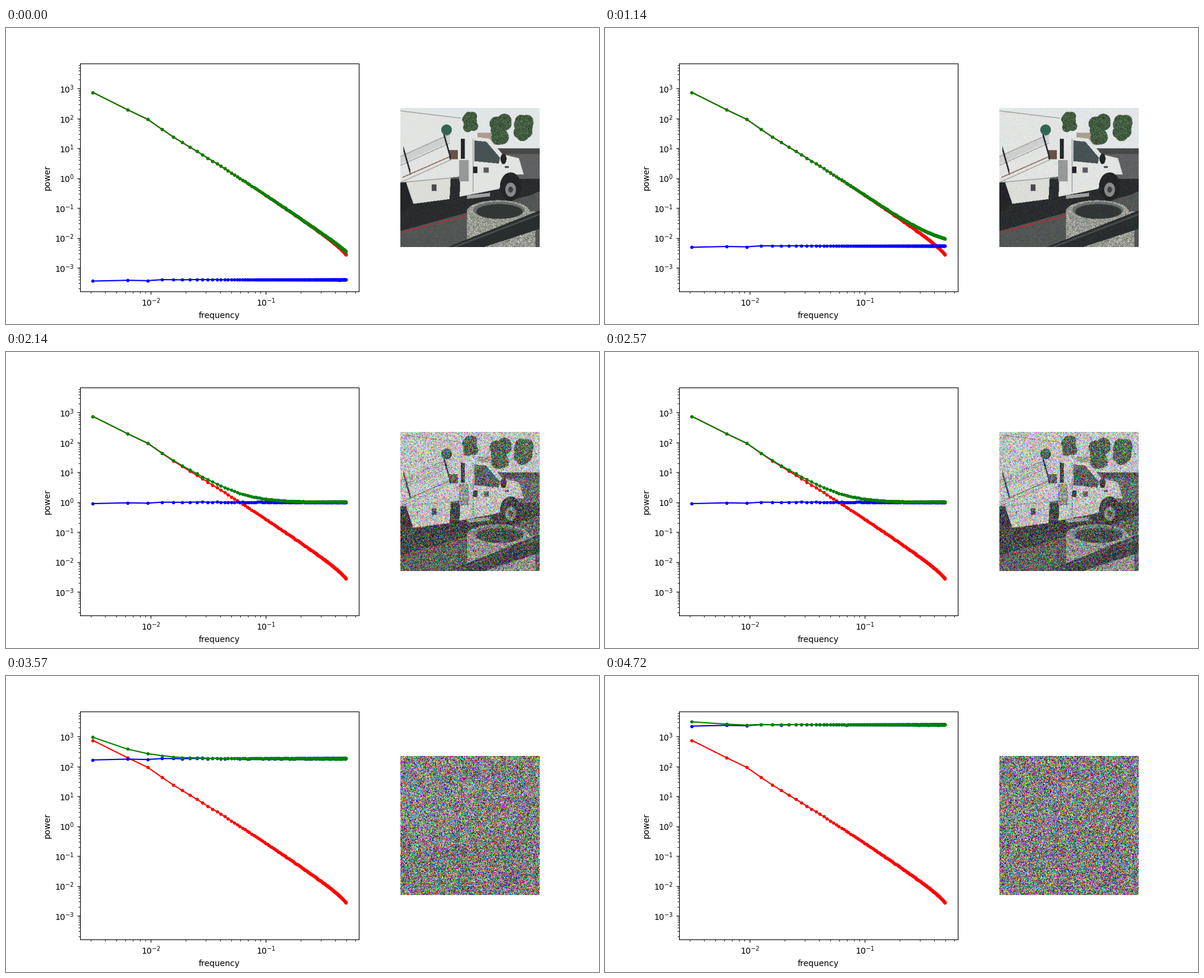
Recreate the animation shown at these times as a matplotlib script. Size 1000 by 500 pixels, loop 5010 ms.

```python
import numpy as np
import matplotlib.pyplot as plt
from matplotlib.animation import FuncAnimation
from matplotlib.path import Path

LOOP_MS, STEP_MS = 5010, 30
SIGMAS = np.geomspace(0.02, 50, 7)
SIZE, SPAN = 320, 235  # photo samples and its width in drawing units
rng = np.random.default_rng(4)

# --- photo: a few flat shapes painted on a grid ---
axis = (np.arange(SIZE) + 0.5) * SPAN / SIZE
X, Y = np.meshgrid(axis, axis)
photo = np.empty((SIZE, SIZE, 3))


def paint(mask, color, grain=0.0):
    speckle = grain * rng.standard_normal((SIZE, SIZE, 1))
    photo[mask] = (np.array(color) / 255 + speckle)[mask]


def polygon(color, *points):
    grid = np.column_stack([X.ravel(), Y.ravel()])
    paint(Path(points).contains_points(grid).reshape(X.shape), color)


def ellipse(color, cx, cy, rx, ry, grain=0.0):
    paint(np.hypot((X - cx) / rx, (Y - cy) / ry) < 1, color, grain)


def band(color, y0, slope, height, left, right):
    """Sloping stripe whose centre is y0 + slope * x."""
    paint((abs(Y - y0 - slope * X) < height / 2) & (X > left) & (X < right), color)


def draw_ground():
    paint(Y < 78, (226, 230, 231))
    band((170, 158, 146), 60, 0, 36, 130, 160)
    for cx, cy, radius in (117, 24, 13), (172, 36, 20), (210, 36, 18):
        for dx, dy in rng.uniform(-0.5, 0.5, (9, 2)) * radius * (1, 1.6):
            ellipse((66, 92, 64), cx + dx, cy + dy, radius * 0.6, radius * 0.6, 0.1)
    band((72, 72, 70), 73, 0, 10, 150, SPAN)
    paint(Y > 78, (96, 97, 99), 0.02)
    paint((Y > 120) & (Y < 242 - 0.43 * X), (42, 44, 46), 0.02)
    paint(Y > 208 - 0.277 * X, (82, 86, 84), 0.03)
    band((156, 54, 62), 210, -0.25, 2.2, 0, 118)


def draw_truck():
    white, seam, dark = (226, 228, 226), (160, 162, 162), (36, 38, 40)
    ellipse(dark, 2, 148, 17, 27)
    paint((X < 104) & (Y > 4 + 0.12 * X) & (Y < 126 - 0.1 * X), white)
    band(seam, 5, 0.12, 1.5, 0, 102)
    band((206, 208, 207), 88, -0.45, 13, 0, 84)
    for y0 in 82, 97, 126:
        band(seam, y0, -0.45, 1.6, 0, 84)
    band((150, 112, 98), 119, -0.44, 2, 4, 94)
    band((104, 82, 74), 79, 0, 16, 82, 97)
    for left, top in (5, 68), (73, 43):
        band(dark, top - 3.5 * left, 3.5, 9, left, left + 12)
    ellipse((52, 102, 86), 78, 37, 9, 9)
    # tool box
    polygon((220, 221, 216), (9, 124), (85, 117), (83, 154), (22, 162))
    band(seam, 126, -0.09, 1.5, 9, 85)
    band((74, 76, 78), 135, 0, 11, 53, 61)
    # cab
    polygon(white, (103, 46), (150, 52), (172, 78), (200, 85), (208, 112),
            (186, 112), (166, 137), (100, 150))
    band(dark, 69, 0, 34, 102, 109)
    band((150, 153, 153), 106, 0, 36, 99, 115)
    polygon((72, 82, 84), (125, 55), (145, 57), (168, 84), (166, 94), (125, 90))
    band(seam, 97, 0, 90, 122, 123.2)
    band(dark, 105, 0, 11, 123, 130)
    band((90, 92, 94), 105, 0, 9, 140, 149)
    band((60, 62, 64), 100, 0, 3, 176, 183)
    band((160, 162, 160), 163, -0.11, 6, 112, 151)
    ellipse(dark, 174, 86, 5, 9)
    ellipse(dark, 186, 133, 18, 24)
    ellipse((136, 138, 138), 186, 138, 9, 12)
    ellipse((62, 64, 66), 186, 138, 4, 5)


def draw_planter():
    stone = (154, 156, 148)
    paint((abs(X - 170) < 58) & (Y > 175), stone, 0.17)
    ellipse(stone, 165, 175, 53, 19, 0.15)
    ellipse((104, 110, 108), 166, 173, 43, 14.5)
    ellipse((50, 55, 54), 167, 175, 39, 12.5)
    paint((Y > 267 - 0.4 * X) & (Y < 281 - 0.326 * X), (42, 46, 47))
    band((72, 77, 78), 270, -0.385, 3, 90, SPAN)


draw_ground()
draw_truck()
draw_planter()
noise = rng.standard_normal(photo.shape)
photos = [np.clip(photo + sigma / 2 * noise, 0, 1) for sigma in SIGMAS]

# --- radial power spectra ---
k = np.arange(1, SIZE // 2)
freq = k / SIZE
decade = np.log10(k)
falloff = 2.022 * decade + 0.178 * decade ** 2 + 0.12 * (k / k[-1]) ** 6
bump = 0.105 * np.exp(-((decade - 0.45) / 0.16) ** 2)
signal = 10 ** (2.873 - falloff + bump)
flatness = 1 + 0.008 * rng.standard_normal(len(k))
flatness[:3] = 0.895, 0.95, 0.925
overlap = 0.1 / k + 0.33 * (k / k[-1]) ** 3  # chance correlation of signal and noise

# --- figure ---
fig, (plot, view) = plt.subplots(1, 2, figsize=(10, 5), dpi=100,
                                 gridspec_kw={"width_ratios": [2, 1]})
plot.loglog(freq, signal, "r.-")
noise_line, = plot.loglog(freq, signal, "b.-")
total_line, = plot.loglog(freq, signal, "g.-")
plot.set_ylim(10 ** -3.793, 10 ** 3.838)
plot.set_xlabel("frequency")
plot.set_ylabel("power")
picture = view.imshow(photos[0])
view.axis("off")


def update(i):
    # a tick shows the noise level reached by its end
    stage = ((i + 1) * STEP_MS - 1) * len(SIGMAS) // LOOP_MS
    level = SIGMAS[stage] ** 2 * flatness
    noise_line.set_ydata(level)
    total_line.set_ydata(signal + level + overlap * np.sqrt(signal * level))
    picture.set_data(photos[stage])
    return noise_line, total_line, picture


anim = FuncAnimation(fig, update, frames=LOOP_MS // STEP_MS, interval=STEP_MS,
                     repeat=True, repeat_delay=0)
plt.show()
```
